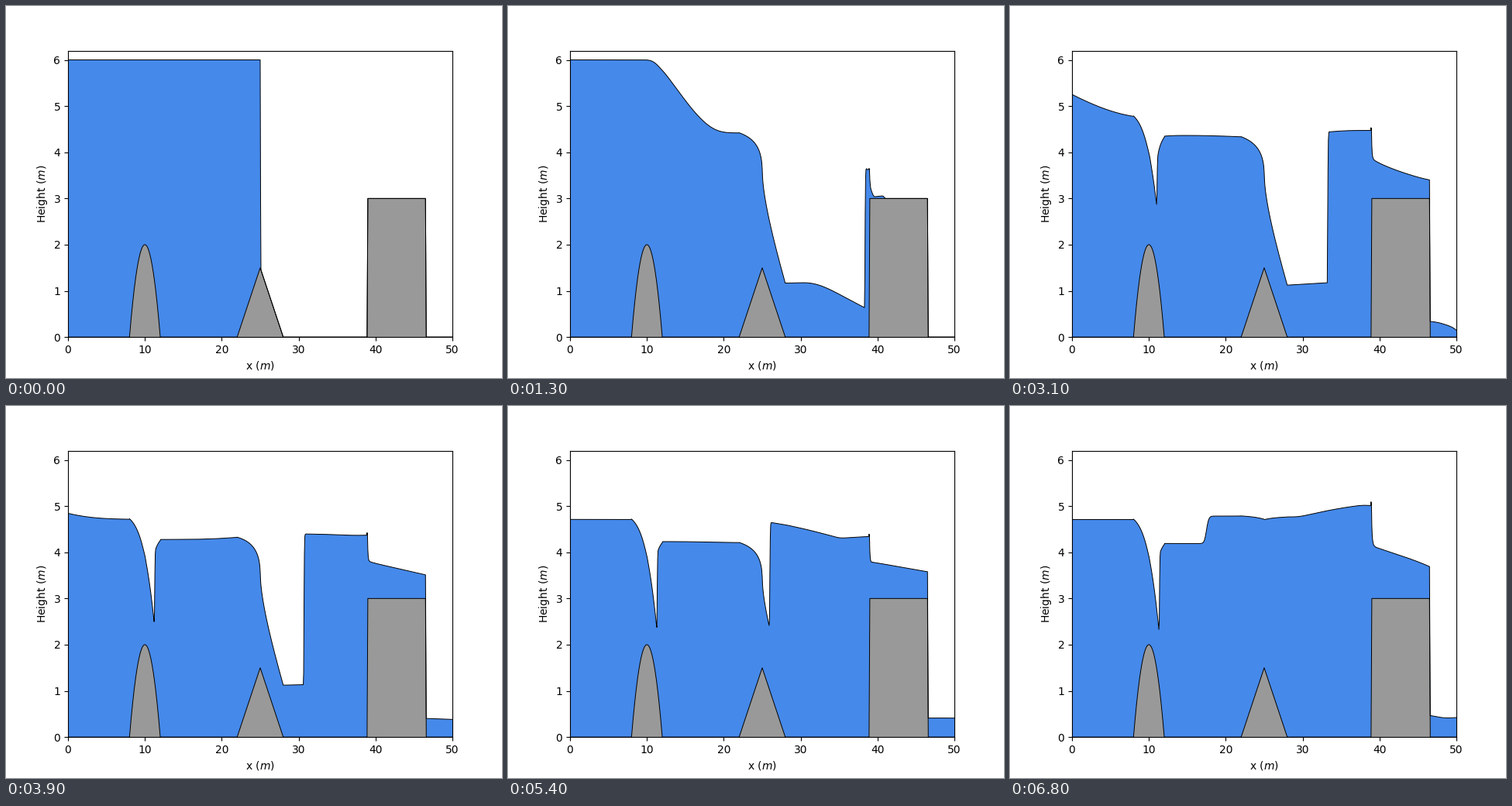
Animation of 640x480 px, one loop 6.9 s. Source, as a matplotlib script:

```python
"""Dam break over three obstacles: 1D shallow water, drawn with matplotlib."""
import numpy as np
import matplotlib.pyplot as plt
from matplotlib.animation import FuncAnimation

G, MANNING = 9.81, 0.02
LENGTH, DX = 50.0, 0.05
T_END, FRAMES = 9.95, 69
CFL, DRY, U_MAX = 0.45, 1e-3, 20.0

WATER, GROUND = "#4589ea", "#999999"

x = np.linspace(0, LENGTH, int(round(LENGTH / DX)) + 1)
# Neighbour index with one open-boundary ghost cell per side
ghost = np.clip(np.arange(-1, x.size + 1), 0, x.size - 1)


def make_bed():
    bump = 2 - 0.5 * (x - 10) ** 2
    wedge = 1.5 - 0.5 * np.abs(x - 25)
    block = np.interp(x, [38.9, 39, 46.5, 46.6], [0, 3, 3, 0])
    return np.maximum.reduce([bump, wedge, block, np.zeros_like(x)])


bed = make_bed()
bed_l, bed_r = bed[ghost][:-1], bed[ghost][1:]
bed_top = np.maximum(bed_l, bed_r)


def velocity(h, q, dt):
    """Flow speed after implicit bed friction; nearly dry cells stand still."""
    deep = np.maximum(h, DRY)
    u = np.where(h > DRY, q / deep, 0.0)
    u = np.clip(u, -U_MAX, U_MAX)
    return u / (1 + dt * G * MANNING ** 2 * np.abs(u) / deep ** (4 / 3))


def step(h, u, dt):
    """One finite-volume step: HLL flux with hydrostatic reconstruction."""
    hg, ug = h[ghost], u[ghost]
    a = np.maximum(hg[:-1] + bed_l - bed_top, 0)
    b = np.maximum(hg[1:] + bed_r - bed_top, 0)
    ua, ub = ug[:-1], ug[1:]
    ca, cb = np.sqrt(G * a), np.sqrt(G * b)
    s0 = np.minimum(np.minimum(ua - ca, ub - cb), 0)
    s1 = np.maximum(np.maximum(ua + ca, ub + cb), 0)
    span = s1 - s0 + 1e-12
    qa, qb = a * ua, b * ub
    pa, pb = G / 2 * a * a, G / 2 * b * b
    mass = (s1 * qa - s0 * qb + s0 * s1 * (b - a)) / span
    push = (s1 * (qa * ua + pa) - s0 * (qb * ub + pb)
            + s0 * s1 * (qb - qa)) / span
    k = dt / DX
    q = h * u - k * ((push - pa)[1:] - (push - pb)[:-1])
    h = np.maximum(h - k * np.diff(mass), 0)
    return h, velocity(h, q, dt)


def simulate():
    """Levels at evenly spaced solver steps, so time follows the CFL limit."""
    surface = np.interp(x, [25, 25.1], [6, 0])
    h = np.maximum(surface - bed, 0)
    u = np.zeros_like(x)
    history = [h + bed]
    t = 0.0
    while t < T_END:
        dt = CFL * DX / np.max(np.abs(u) + np.sqrt(G * h))
        h, u = step(h, u, dt)
        t += dt
        history.append(h + bed)
    picks = np.linspace(0, len(history) - 1, FRAMES).round().astype(int)
    return [history[i] for i in picks]


def outline(top):
    """Closed polygon between a profile and the floor."""
    xs = np.concatenate(([x[0]], x, [x[-1]]))
    ys = np.concatenate(([0], top, [0]))
    return np.column_stack((xs, ys))


levels = simulate()

plt.rcParams["font.family"] = "DejaVu Sans"
fig, ax = plt.subplots(figsize=(6.4, 4.8), dpi=100)
ax.set_xlim(0, LENGTH)
ax.set_ylim(0, 6.2)
ax.set_xlabel("x ($m$)")
ax.set_ylabel("Height ($m$)")

water = plt.Polygon(outline(levels[0]), fc=WATER, ec="none", zorder=1)
ground = plt.Polygon(outline(bed), fc=GROUND, ec="none", zorder=1.5)
ax.add_patch(water)
ax.add_patch(ground)
ax.plot(x, bed, color="black", lw=0.7)
surface_line, = ax.plot(x, levels[0], color="black", lw=0.7)


def update(i):
    water.set_xy(outline(levels[i]))
    surface_line.set_ydata(levels[i])
    return water, surface_line


anim = FuncAnimation(fig, update, frames=FRAMES, interval=100,
                     repeat=True, repeat_delay=0, blit=False)
plt.show()
```
